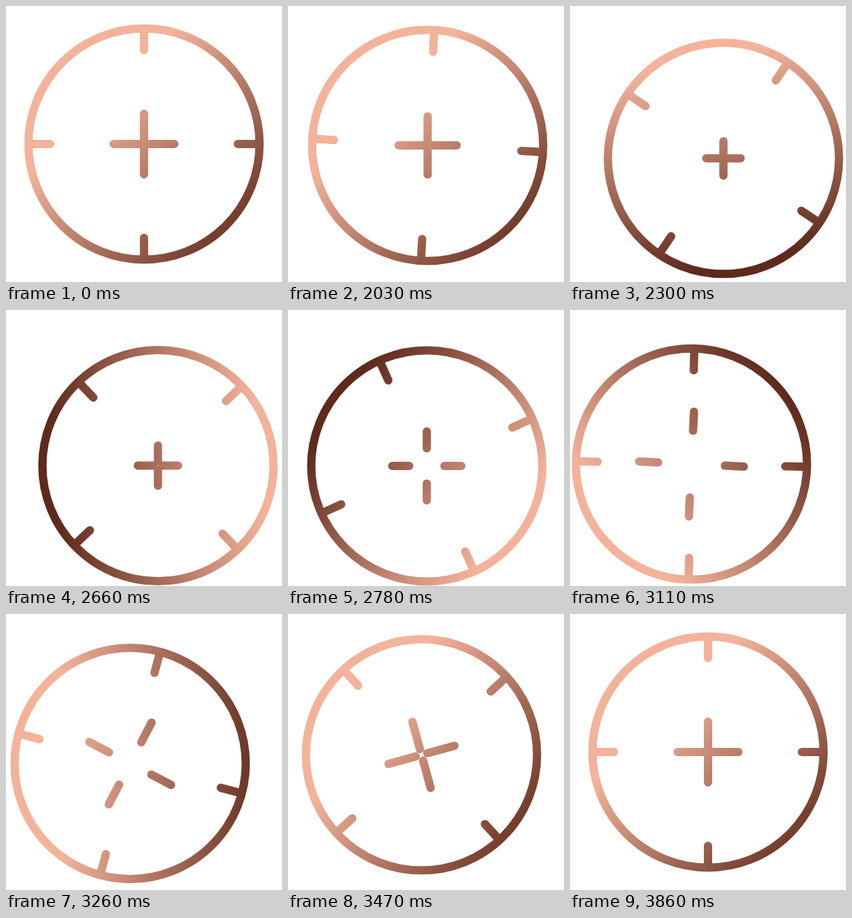
Recreate the animation shown at these times as an HTML page. Size 400x400 px, loop 3.89 s.

```html
<!DOCTYPE html>
<html lang="en">
<head>
<meta charset="utf-8">
<title>Crosshair</title>
<style>
  html, body { margin: 0; width: 100%; height: 100%; overflow: hidden; background: #fff; }
  svg { display: block; width: 100%; height: 100%; }
</style>
</head>
<body>
<svg viewBox="0 0 400 400">
  <defs>
    <linearGradient id="copper" gradientUnits="userSpaceOnUse">
      <stop offset="0" stop-color="#f3b39b"/>
      <stop offset="1" stop-color="#5e2a1c"/>
    </linearGradient>
  </defs>
  <path id="shape" fill="none" stroke="url(#copper)" stroke-width="12" stroke-linecap="round"/>
</svg>
<script>
const LOOP = 3890, HOLD = 2030, STEP = 30, LAST = 61;
const RADIUS = 167.5, TICK_END = 136, GRADIENT_LENGTH = 300;
const copper = document.getElementById('copper');
const shape = document.getElementById('shape');

const rad = deg => deg * Math.PI / 180;
const progress = (n, from, to) => Math.min(1, Math.max(0, (n - from) / (to - from)));

// Eased in and out
const ease = (n, from, to) => {
  const t = progress(n, from, to);
  return t * t * (3 - 2 * t);
};

// Starts at speed, eased out
const launch = (n, to) => {
  const t = progress(n, -1, to);
  return 1.15 * t * (1 - t) * (1 - t) + t * t * (3 - 2 * t);
};

function pose(n) {
  const out = launch(n, 13);
  const spread = ease(n, 17.8, 32);
  const back = ease(n, 34, 53);
  const sag = Math.sin(Math.PI * progress(n, 16, 34));
  return {
    x: 200 + 23.5 * launch(n, 11) - 47.5 * ease(n, 19, 31.5) + 24 * ease(n, 36.5, 54),
    y: 200 + 24 * out + 2 * sag - 24 * back,
    ringTurn: 39 * out + 51 * ease(n, 17.5, 32) + 90 * ease(n, 34, 61),
    plusTurn: 90 * back,
    gap: 50 * (spread - back),
    arm: 44 - 22 * out + 5 * spread + 17 * back,
    light: 360 * ease(n, -1, 53),
    shade: 0.29 + 0.2 * (ease(n, -1, 9) - ease(n, 30, 46))
  };
}

// Four radial strokes, a quarter turn apart
function spokes(x, y, turn, inner, outer) {
  return [0, 90, 180, 270].map(quarter => {
    const a = rad(turn + quarter);
    const at = r => `${(x + r * Math.cos(a)).toFixed(2)} ${(y + r * Math.sin(a)).toFixed(2)}`;
    return `M${at(inner)}L${at(outer)}`;
  }).join('');
}

function ring(x, y, r) {
  return `M${x - r} ${y}a${r} ${r} 0 1 1 ${2 * r} 0a${r} ${r} 0 1 1 ${-2 * r} 0z`;
}

function draw(time) {
  const t = time % LOOP;
  const n = t < HOLD ? -1 : Math.min(LAST, Math.floor((t - HOLD) / STEP));
  const p = pose(n);
  shape.setAttribute('d',
    ring(p.x, p.y, RADIUS) +
    spokes(p.x, p.y, p.ringTurn, TICK_END, RADIUS) +
    spokes(p.x, p.y, p.plusTurn, p.gap, p.gap + p.arm));

  const a = rad(45 + p.light);
  const place = (id, r) => {
    copper.setAttribute('x' + id, p.x + r * Math.cos(a));
    copper.setAttribute('y' + id, p.y + r * Math.sin(a));
  };
  place(1, -p.shade * GRADIENT_LENGTH);
  place(2, (1 - p.shade) * GRADIENT_LENGTH);
}

const start = performance.now();
function tick() {
  draw(performance.now() - start);
  requestAnimationFrame(tick);
}
tick();
</script>
</body>
</html>
```
